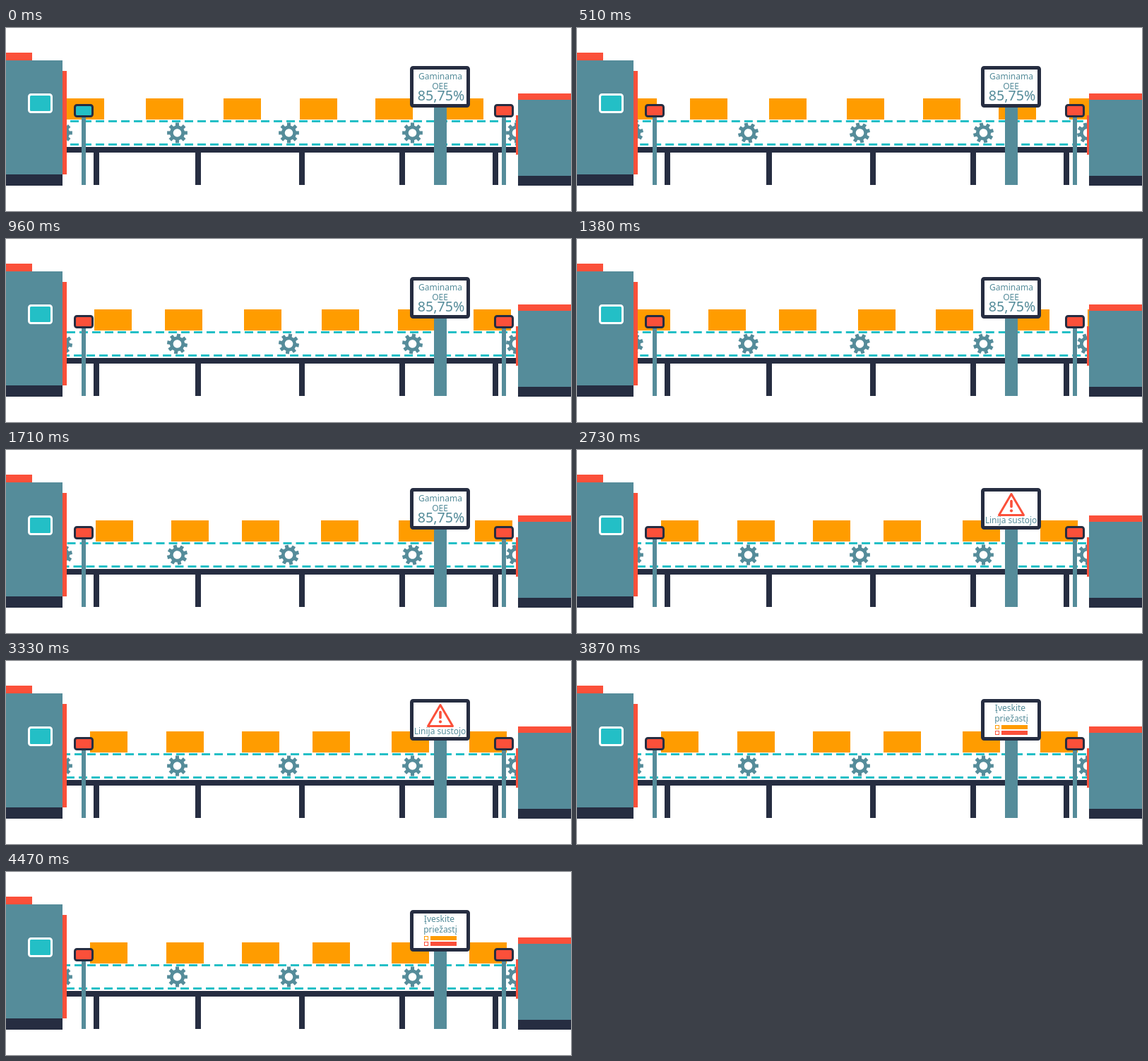
Write an HTML page that moves like this. It is 800 px wide and 260 px high and loops after 4.5 s.

```html
<!DOCTYPE html>
<html lang="lt">
<head>
<meta charset="utf-8">
<title>Gamybos linija</title>
<style>
html, body { margin: 0; width: 100%; height: 100%; overflow: hidden; background: #fff; }
svg { display: block; }
text { font-family: "Noto Sans", "Open Sans", sans-serif; font-size: 12px; fill: #558c9a; text-anchor: middle; }
.steel { fill: #558c9a; }
.dark { fill: #262d41; }
.red { fill: #fb503a; }
.orange { fill: #ff9c00; }
.teal { fill: #23bfc6; }
.belt { stroke: #23bfc6; stroke-width: 3; stroke-dasharray: 12 6; }
.lamp { stroke: #262d41; stroke-width: 3; }
</style>
</head>
<body>
<svg width="800" height="260" viewBox="0 0 800 260">
  <defs>
    <path id="gear" class="steel" fill-rule="evenodd"/>
  </defs>
  <g id="boxes" class="orange"></g>
  <line id="top" class="belt" x1="86" x2="722" y1="132.5" y2="132.5"/>
  <line id="bottom" class="belt" x1="86" x2="722" y1="165.5" y2="165.5"/>
  <g id="gears"></g>

  <g class="dark">
    <rect x="86" y="169" width="637" height="8"/>
    <path d="M124 177h8v46h-8zM268 177h8v46h-8zM415 177h8v46h-8zM557 177h8v46h-8zM689 177h8v46h-8z"/>
  </g>

  <rect class="red" y="35" width="37" height="11"/>
  <rect class="red" x="80" y="61" width="6" height="147"/>
  <rect class="steel" y="46" width="80" height="162"/>
  <rect class="dark" y="208" width="80" height="16"/>
  <rect class="teal" x="32.5" y="94.5" width="32" height="25" rx="3" stroke="#fff" stroke-width="3"/>

  <rect class="red" x="722" y="124" width="4" height="56"/>
  <rect class="steel" x="725" y="102" width="75" height="108"/>
  <rect class="red" x="725" y="93" width="75" height="9"/>
  <rect class="dark" x="725" y="210" width="75" height="14"/>

  <rect class="steel" x="107" y="126" width="6" height="97"/>
  <rect class="steel" x="702" y="126" width="6" height="97"/>
  <rect id="lampIn" class="lamp" x="97.5" y="109.5" width="25" height="16" rx="3"/>
  <rect id="lampOut" class="lamp" x="692.5" y="109.5" width="25" height="16" rx="3"/>

  <rect class="steel" x="606" y="112" width="18" height="111"/>
  <rect x="574.5" y="56.5" width="80" height="54" rx="2" fill="#fff" stroke="#262d41" stroke-width="5"/>
  <g id="running">
    <text x="615" y="73">Gaminama</text>
    <text x="614.5" y="87">OEE</text>
    <text x="616" y="103" style="font-size:19.6px">85,75%</text>
  </g>
  <g id="stopped">
    <path d="M615 62.5L632.5 92.5H597.5Z" fill="none" stroke="#fb503a" stroke-width="3" stroke-linejoin="round"/>
    <path d="M615 72.5V80.5" stroke="#fb503a" stroke-width="3.6" stroke-linecap="round"/>
    <circle class="red" cx="615" cy="86.3" r="2.1"/>
    <text x="614.5" y="104">Linija sustojo</text>
  </g>
  <g id="reason">
    <text x="613.5" y="71">Įveskite</text>
    <text x="615" y="86">priežastį</text>
    <rect x="592.5" y="91.5" width="5" height="5" fill="#fff" stroke="#ff9c00"/>
    <rect class="orange" x="601" y="91" width="37" height="6"/>
    <rect x="592.5" y="99.5" width="5" height="5" fill="#fff" stroke="#fb503a"/>
    <rect class="red" x="601" y="99" width="37" height="6"/>
  </g>
</svg>
<script>
const LOOP = 4500, STEP = 30, STOP = 2404, ASK = 3450, TRAVEL = 348;
const BOX_W = 53;
const starts = [-229, -121, -14, 86, 198, 308, 416, 523, 623];
const gearX = [79.5, 242.5, 400.5, 575.5, 722.5];
const $ = id => document.getElementById(id);

function add(parent, tag, attrs) {
  const el = document.createElementNS("http://www.w3.org/2000/svg", tag);
  for (const key in attrs) el.setAttribute(key, attrs[key]);
  return parent.appendChild(el);
}

function gearPath(teeth, outer, inner, hole) {
  const points = [];
  const put = (r, deg) => {
    const a = (deg - 90) * Math.PI / 180;
    points.push((r * Math.cos(a)).toFixed(2) + " " + (r * Math.sin(a)).toFixed(2));
  };
  for (let i = 0; i < teeth; i++) {
    const mid = i * 360 / teeth;
    put(inner, mid - 14);
    put(outer, mid - 10);
    put(outer, mid + 10);
    put(inner, mid + 14);
  }
  return `M${points.join("L")}ZM${-hole} 0a${hole} ${hole} 0 1 0 ${2 * hole} 0a${hole} ${hole} 0 1 0 ${-2 * hole} 0Z`;
}

$("gear").setAttribute("d", gearPath(8, 14.6, 10.6, 5.8));
const boxes = starts.map(() => add($("boxes"), "rect", { y: 100, width: BOX_W, height: 30 }));
const gears = gearX.map(() => add($("gears"), "use", { href: "#gear" }));

// A lamp turns teal while a box is centred behind it.
function setLamp(id, center, lefts) {
  const seen = lefts.some(x => x >= center - 28 && x < center - 10);
  $(id).setAttribute("fill", seen ? "#23bfc6" : "#fb503a");
}

function show(id, on) {
  $(id).setAttribute("visibility", on ? "visible" : "hidden");
}

function draw(t) {
  const p = Math.min(t / STOP, 1);
  const shift = TRAVEL * p;
  const lefts = starts.map(x => x + shift);

  boxes.forEach((box, i) => box.setAttribute("x", Math.round(lefts[i])));
  gears.forEach((gear, i) =>
    gear.setAttribute("transform", `translate(${gearX[i]} 149) rotate(${360 * p})`));
  $("top").setAttribute("stroke-dashoffset", -(5 + shift));
  $("bottom").setAttribute("stroke-dashoffset", shift - 5);
  setLamp("lampIn", 110, lefts);
  setLamp("lampOut", 705, lefts);
  show("running", t < STOP);
  show("stopped", t >= STOP && t < ASK);
  show("reason", t >= ASK);
}

const begin = performance.now();
function tick() {
  const t = (performance.now() - begin) % LOOP;
  draw(Math.floor(t / STEP) * STEP);
  requestAnimationFrame(tick);
}
draw(0);
requestAnimationFrame(tick);
</script>
</body>
</html>
```
